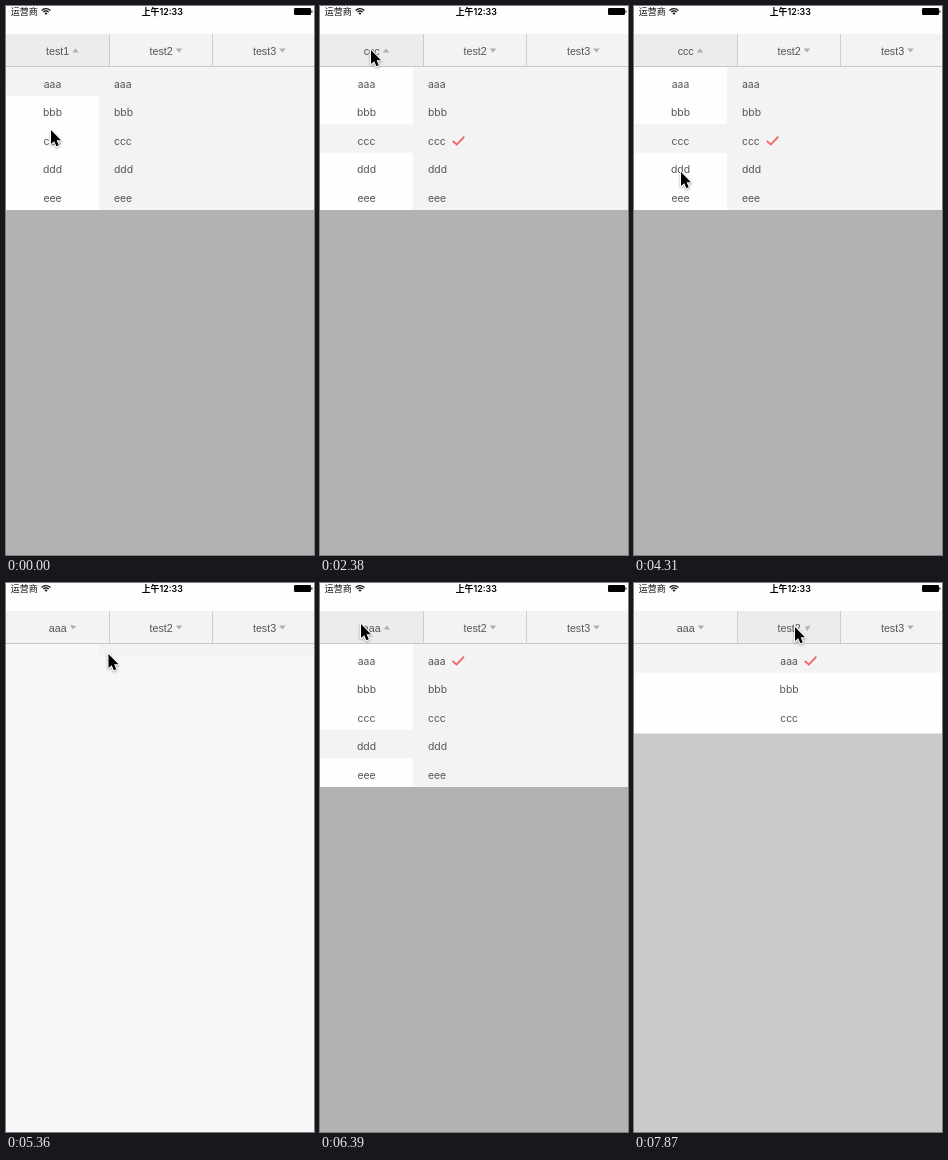
An HTML page with a canvas for the animation above (8000 ms loop, 308 by 549 pixels).

```html
<!DOCTYPE html>
<html lang="zh">
<head>
<meta charset="utf-8">
<title>Drop-down menu</title>
<style>
html, body { margin: 0; width: 100%; height: 100%; overflow: hidden; background: #fefefe; }
canvas { display: block; width: 308px; height: 549px; }
</style>
</head>
<body>
<canvas id="stage"></canvas>
<script>
const W = 308, H = 549, LOOP = 8000, STEP = 148.6, LAST = 53;
const TOP = 61, ROW = 28.6, FULL = 5 * ROW, SPLIT = 93, TAB = 103.4;
const PALE = '#f3f3f3', INK = '#555', WHITE = '#fefefe';
const TITLE = '10.7px "Liberation Sans", Arial, sans-serif';
const CELL = '10.4px Inter, Roboto, sans-serif';
const CJK = '"Noto Sans CJK SC", "Noto Sans CJK", sans-serif';
const NAMES = ['aaa', 'bbb', 'ccc', 'ddd', 'eee'];

// Steps at which the menu closes, opens, closes, ...
const TOGGLES = [9, 15, 20, 26, 35, 42, 46, LAST];
const MOVES = [
  { from: 1, to: 7, x: 136, y: 137 },
  { from: 9, to: 13, x: 50, y: 43 },
  { from: 26, to: 29, x: 46, y: 165 },
  { from: 29, to: 35, x: 122, y: 80 },
  { from: 35, to: 39, x: 40, y: 40 },
  { from: 47, to: LAST, x: 160, y: 43 }
];

const canvas = document.getElementById('stage');
const ratio = window.devicePixelRatio || 1;
canvas.width = W * ratio;
canvas.height = H * ratio;
const ctx = canvas.getContext('2d');

const clamp = v => Math.max(0, Math.min(1, v));

function box(color, x, y, w, h) {
  ctx.fillStyle = color;
  ctx.fillRect(x, y, w, h);
}

function text(str, x, y, font, align = 'center', color = INK) {
  ctx.font = font;
  ctx.textAlign = align;
  ctx.fillStyle = color;
  ctx.fillText(str, x, y);
  return ctx.measureText(str).width;
}

function path(points, closed) {
  ctx.beginPath();
  points.forEach(([x, y]) => ctx.lineTo(x, y));
  if (closed) ctx.closePath();
}

function clipped(x, height, paint) {
  ctx.save();
  ctx.beginPath();
  ctx.rect(x, TOP, W, height);
  ctx.clip();
  paint();
  ctx.restore();
}

function statusBar() {
  text('运营商', 4.8, 9.2, '9px ' + CJK, 'left', '#111');
  text('上午12:33', 156.3, 9.2, '600 8.9px Inter, ' + CJK, 'center', '#000');
  ctx.strokeStyle = ctx.fillStyle = '#111';
  ctx.lineWidth = 1.3;
  for (const r of [3.6, 6]) {
    ctx.beginPath();
    ctx.arc(40, 8.6, r, -Math.PI * .76, -Math.PI * .24);
    ctx.stroke();
  }
  ctx.beginPath();
  ctx.moveTo(40, 8.8);
  ctx.arc(40, 8.6, 1.9, -Math.PI * .78, -Math.PI * .22);
  ctx.fill();
  ctx.fillStyle = '#000';
  ctx.beginPath();
  ctx.roundRect(288, 2, 17, 7, 1.3);
  ctx.roundRect(305.4, 4.2, 1, 2.6, .5);
  ctx.fill();
}

function header(titles, column, active, open) {
  box(PALE, 0, 28, W, 32);
  if (active) box('#ececec', column * TAB, 28, TAB, 32);
  box('#cdcdcd', 103, 28, 1, 32);
  box('#cdcdcd', 206, 28, 1, 32);
  box('#c8c8c8', 0, 60, W, 1);
  titles.forEach((title, i) => {
    const center = (i + .5) * TAB;
    const w = text(title, center, 48.5, TITLE);
    ctx.save();
    ctx.translate(center + w / 2 + 6.3, 44.4);
    if (i === column) ctx.rotate(Math.PI * open);
    path([[-3.3, -2], [3.3, -2], [0, 2]], true);
    ctx.fillStyle = '#afafaf';
    ctx.fill();
    ctx.restore();
  });
}

function list(names, x, align, checked) {
  names.forEach((name, i) => {
    const y = 81.6 + i * 28.5;
    const w = text(name, x, y, CELL, align);
    if (i !== checked) return;
    const left = x + (align === 'left' ? w : w / 2) + 7;
    path([[left, y - 3.6], [left + 4, y], [left + 11.5, y - 8]]);
    ctx.strokeStyle = '#f4605f';
    ctx.lineWidth = 1.7;
    ctx.stroke();
  });
}

function menu(open, double, picked, checked) {
  const lead = clamp(1.1 * open - .1); // the left list folds a little ahead
  clipped(0, FULL * lead, () => {
    box(WHITE, 0, TOP, double ? SPLIT : W, FULL);
    box(PALE, 0, TOP + picked * ROW, double ? SPLIT : W, ROW);
    if (double) list(NAMES, SPLIT / 2, 'center');
    else list(NAMES.slice(0, 3), 1.5 * TAB, 'center', checked);
  });
  if (double) clipped(SPLIT, FULL * open, () => {
    box(PALE, SPLIT, TOP, W, FULL);
    list(NAMES, 108, 'left', checked);
  });
}

function pointer(step) {
  let x = 44, y = 123;
  for (const m of MOVES) {
    const f = clamp((step - m.from) / (m.to - m.from));
    x += (m.x - x) * f;
    y += (m.y - y) * f;
  }
  ctx.save();
  ctx.translate(x + 1, y + 1);
  path([[0, 0], [0, 14], [3.2, 11.2], [5.4, 16.3], [7.8, 15.3], [5.6, 10.2], [10, 10.2]], true);
  ctx.lineJoin = 'round';
  ctx.shadowColor = 'rgba(0,0,0,.35)';
  ctx.shadowBlur = 2.5 * ratio;
  ctx.shadowOffsetY = ratio;
  ctx.strokeStyle = '#fff';
  ctx.lineWidth = 2;
  ctx.stroke();
  ctx.shadowColor = 'transparent';
  ctx.fillStyle = '#000';
  ctx.fill();
  ctx.restore();
}

function draw(time) {
  const step = Math.min(LAST, Math.floor((time + 6) / STEP));
  const count = TOGGLES.filter(t => t <= step).length;
  const age = count ? step - TOGGLES[count - 1] : LAST;
  const active = count % 2 === 0;
  const open = clamp(active ? .66 + .4 * age : .68 - .6 * age);
  const column = step < LAST ? 0 : 1;
  const first = count < 1 ? 'test1' : count < 5 ? 'ccc' : 'aaa';
  const picked = column || step < 1 ? 0 : step < 30 ? 2 : 3;
  const checked = column ? 0 : NAMES.indexOf(first);

  ctx.setTransform(ratio, 0, 0, ratio, 0, 0);
  box(WHITE, 0, 0, W, H);
  // A faint veil stays behind while "ccc" is chosen
  const veil = open || (first === 'ccc' ? .075 : 0);
  const veilTop = open ? TOP : 158;
  box(`rgba(0,0,0,${.302 * veil})`, 0, veilTop, W, H - veilTop);
  menu(open, !column, picked, checked);
  statusBar();
  header([first, 'test2', 'test3'], column, active, open);
  pointer(step);
}

const start = performance.now();
function tick() {
  draw((performance.now() - start) % LOOP);
  requestAnimationFrame(tick);
}
tick();
</script>
</body>
</html>
```
